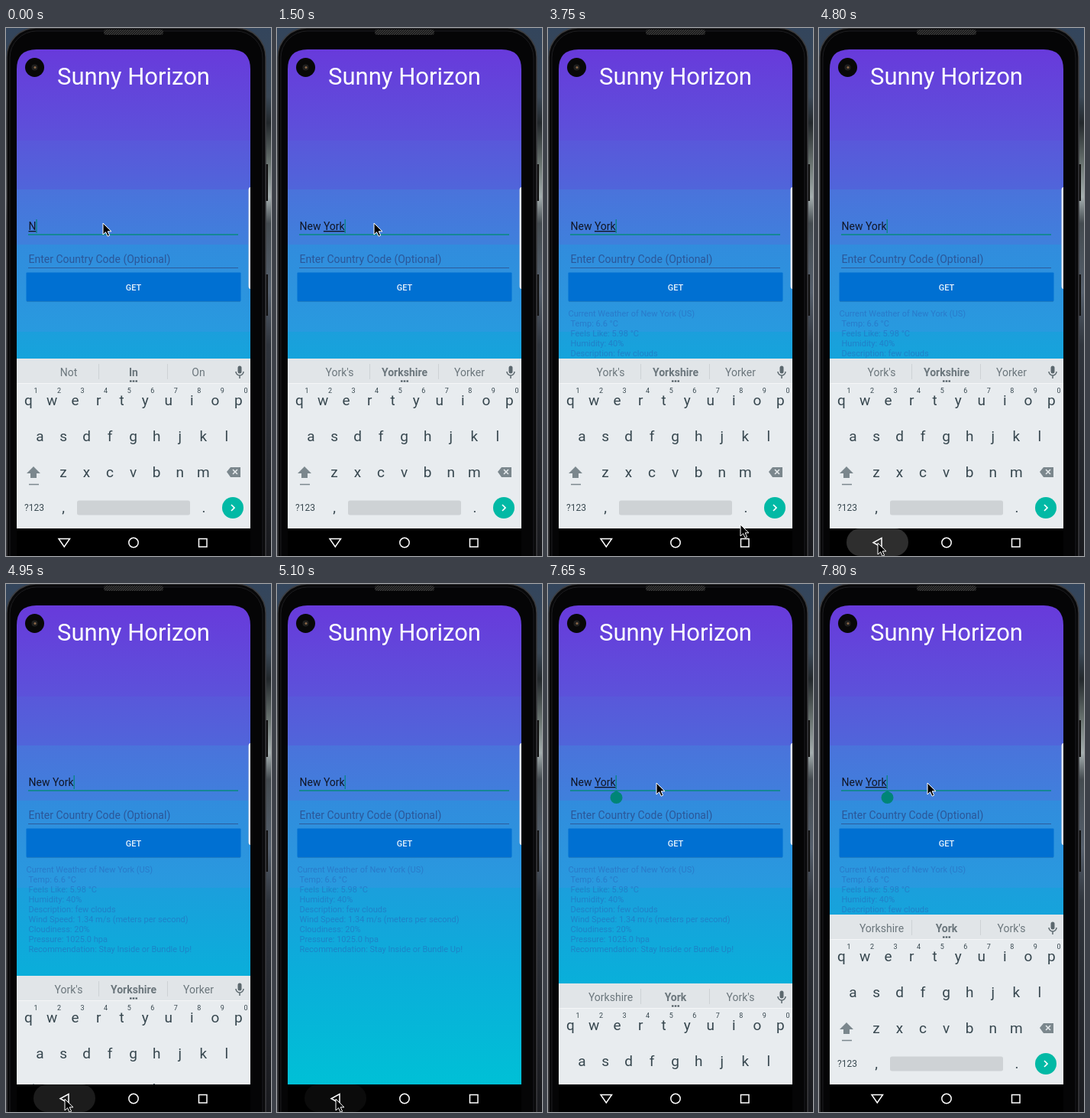
Write an HTML page that moves like this. It is 347 by 690 pixels and loops after 8000 ms.

```html
<!DOCTYPE html>
<html lang="en">
<head>
<meta charset="utf-8">
<style>
html, body { margin: 0; width: 347px; height: 690px; overflow: hidden; background: #000; }
svg { display: block; }
text { font-family: Roboto, sans-serif; white-space: pre; }
.mid { text-anchor: middle; }
.u { text-decoration: underline; }
</style>
</head>
<body>
<svg width="347" height="690" viewBox="0 0 347 690">
  <defs>
    <linearGradient id="sky" x2="0" y2="1">
      <stop offset="0" stop-color="#683adb"/>
      <stop offset=".19" stop-color="#5c52da"/>
      <stop offset=".19" stop-color="#5958da"/>
      <stop offset=".293" stop-color="#5065da"/>
      <stop offset=".293" stop-color="#4a73db"/>
      <stop offset=".407" stop-color="#3f80dc"/>
      <stop offset=".407" stop-color="#318cdd"/>
      <stop offset=".59" stop-color="#289adf"/>
      <stop offset=".59" stop-color="#1b9fdc"/>
      <stop offset=".77" stop-color="#0aaeda"/>
      <stop offset="1" stop-color="#00c0d6"/>
    </linearGradient>
    <linearGradient id="wall" x2="0" y2="1">
      <stop offset="0" stop-color="#33455c"/>
      <stop offset=".13" stop-color="#3b4856"/>
      <stop offset=".18" stop-color="#23282c"/>
      <stop offset=".26" stop-color="#6c7673"/>
      <stop offset=".32" stop-color="#a5afb0"/>
      <stop offset=".37" stop-color="#444b50"/>
      <stop offset=".5" stop-color="#555f6c"/>
      <stop offset=".6" stop-color="#30353d"/>
      <stop offset="1" stop-color="#191a1e"/>
    </linearGradient>
    <pattern id="mesh" width="3" height="3" patternUnits="userSpaceOnUse">
      <rect width="3" height="3" fill="#1b1b1b"/><path d="M0 3L3 0" stroke="#555" stroke-width=".7"/>
    </pattern>
    <clipPath id="screen"><path d="M14 654V54Q14 28 40 28H294Q320 28 320 54V654Z"/></clipPath>
  </defs>

  <rect width="347" height="690" fill="url(#wall)"/>
  <path d="M339 178h4v48h-4zM339 322h4v54h-4z" fill="#111"/>
  <rect x="1" y="0" width="339" height="740" rx="38" fill="#080809" stroke="#3c3d40" stroke-width="1.5"/>
  <rect x="5" y="4" width="331" height="740" rx="35" fill="#050506" stroke="#1d1d20"/>
  <rect x="128" y="2" width="78" height="7" rx="3.5" fill="url(#mesh)"/>

  <g clip-path="url(#screen)">
    <rect x="14" y="28" width="306" height="626" fill="url(#sky)"/>
    <text class="mid" x="167" y="74" font-size="31" fill="#fff">Sunny Horizon</text>
    <circle cx="37.500" cy="51.500" r="12.500" fill="#080808"/>
    <circle cx="37.500" cy="51.500" r="4" fill="#20201f"/>
    <circle cx="38" cy="51.500" r="1.500" fill="#8a6848"/>
    <path d="M29 270H304" stroke="#078a7e" stroke-width="1.600"/>
    <path d="M29 313.500H304" stroke="#2d5c9c"/>
    <text id="field" x="29.500" y="264" font-size="14" fill="#101626"><tspan id="done"></tspan><tspan id="word" class="u"></tspan></text>
    <path id="caret" d="M0 250V268" stroke="#07857f" stroke-width="1.300"/>
    <text x="29.500" y="307" font-size="14" fill="#2b5799">Enter Country Code (Optional)</text>
    <rect x="27" y="321" width="280" height="37" rx="1" fill="#1565a8" opacity=".5"/>
    <rect id="get" x="26.500" y="319.500" width="281" height="37.500" rx="1" fill="#0070d2"/>
    <text class="mid" x="167" y="342.500" font-size="11" font-weight="500" fill="#e8f2fc">GET</text>
    <g id="report" font-size="11" fill="#2a5db4" fill-opacity=".48"></g>
    <path id="handle" d="M89.500 270L95.200 273.500A8 8 0 1 1 83.800 273.500Z" fill="#008577"/>
    <path d="M320 208Q317.500 208 317.500 212V337Q317.500 341 320 341Z" fill="#dfe3ee"/>

    <g id="board">
      <rect x="14" y="432" width="306" height="222" fill="#e8ecef"/>
      <rect x="14" y="432" width="306" height="32" fill="#e1e5e8"/>
      <path d="M14 464.500H320" stroke="#f4f6f7"/>
      <path d="M121.500 439V459M211.500 439V459" stroke="#cdd2d5"/>
      <g id="hints" font-size="14" fill="#6b767c"></g>
      <path d="M162 461.500h2.500m1.250 0h2.500m1.250 0h2.500" stroke="#46535a" stroke-width="2"/>
      <g fill="none" stroke="#5c686e" stroke-width="1.500">
        <path d="M301 449a5 5 0 0 0 10 0M306 454V458"/>
        <path d="M306 444V449" stroke-width="5" stroke-linecap="round"/>
      </g>
      <g id="keys" fill="#37474f"></g>
      <path d="M36 573L45 582H40V588H32V582H27Z" fill="#7b878d"/>
      <path d="M30 596.500H43" stroke="#7b878d" stroke-width="1.500"/>
      <path d="M289 580L294 574H307V587H294Z" fill="#7b878d"/>
      <path d="M297 577l6 6m0-6l-6 6" stroke="#e8ecef" stroke-width="1.500"/>
      <rect x="93" y="617.500" width="148" height="19" rx="2.500" fill="#ced2d5"/>
      <circle cx="297" cy="627" r="14" fill="#02b9a5"/>
      <path d="M295 623l4 4-4 4" fill="none" stroke="#fff" stroke-width="1.700"/>
    </g>
  </g>

  <rect x="14" y="654" width="306" height="36" fill="#000"/>
  <rect id="press" x="36" y="654" width="81" height="36" rx="18" fill="#fff"/>
  <g fill="none" stroke="#fff" stroke-width="1.500">
    <path id="back"/>
    <circle cx="167" cy="672.500" r="6.200"/>
    <rect x="252.500" y="667.500" width="10.500" height="10.500"/>
  </g>
  <path id="mouse" d="M0 0V15L3.600 11.700 6.100 17.200 8.600 16.100 6.200 10.800H11Z" fill="#000" stroke="#fff" stroke-width="1"/>
</svg>
<script>
const LOOP = 8000, STEP = 150;
const $ = id => document.getElementById(id);
const label = (x, y, s, attrs = '') => `<text x="${x}" y="${y}" ${attrs}>${s}</text>`;
const mid = (x, y, s, size) => label(x, y, s, `class="mid" font-size="${size}"`);

$('report').innerHTML = [
  'Current Weather of New York (US)', 'Temp: 6.6 °C', 'Feels Like: 5.98 °C', 'Humidity: 40%',
  'Description: few clouds', 'Wind Speed: 1.34 m/s (meters per second)', 'Cloudiness: 20%',
  'Pressure: 1025.0 hpa', 'Recommendation: Stay Inside or Bundle Up!'
].map((s, i) => label(i ? 29.5 : 26.5, 377 + 13 * i, s)).join('');

$('keys').innerHTML = [['qwertyuiop', 29.5, 493], ['asdfghjkl', 44.5, 540], ['zxcvbnm', 75, 587]]
  .map(([row, x, y]) => [...row].map((c, i) => mid(x + 30.55 * i, y, c, 19)).join('')).join('')
  + [...'1234567890'].map((c, i) => mid(39 + 30.55 * i, 477, c, 9)).join('')
  + mid(37, 631, '?123', 12) + mid(75, 633, ',', 19) + mid(259, 633, '.', 19);

// [start, value]: each value holds until the next start
const typed = [[0, 'N'], [150, 'Ne'], [300, 'New'], [600, 'New '], [1050, 'New Y'],
  [1200, 'New Yo'], [1350, 'New Yor'], [1500, 'New York']];
const hints = [[0, 'Not In On'], [150, 'Need New Never'], [450, 'News New Newer'], [750, 'Year York one'],
  [1050, 'You Yes Your'], [1200, 'Your You York'], [1350, 'Yor York Your'],
  [1500, "York's Yorkshire Yorker"], [7650, "Yorkshire York York's"]];
const slide = [[0, 0], [4950, 80], [5100, 222], [7650, 90], [7800, 0]];
const glow = [[0, 0], [4650, .08], [4800, .18], [4950, .11], [5100, .045], [5400, 0]];
const caretOn = [[0, 1], [1950, 0], [2550, 1], [3000, 0], [3450, 1], [3900, 0], [4350, 1],
  [5400, 0], [5850, 1], [6300, 0], [6900, 1], [7350, 0], [7650, 1]];
const path = [[0, 127, 255], [1800, 127, 255], [2550, 163, 337], [3150, 163, 337], [3750, 252, 649],
  [4200, 190, 669], [4650, 77, 673], [6450, 77, 673], [6750, 185, 303], [7350, 142, 260], [LOOP, 142, 260]];

const at = (list, t) => list.findLast(e => e[0] <= t)[1];
const show = (id, on) => $(id).style.display = on ? '' : 'none';

function pointer(t) {
  const i = path.findIndex(p => p[0] > t), [t0, x0, y0] = path[i - 1], [t1, x1, y1] = path[i];
  const k = (t - t0) / (t1 - t0);
  return [x0 + (x1 - x0) * k, y0 + (y1 - y0) * k];
}

function draw(now) {
  const t = Math.floor(now % LOOP / STEP) * STEP;
  const text = at(typed, t), cut = text.lastIndexOf(' ') + 1;
  $('done').textContent = text.slice(0, cut);
  $('word').textContent = text.slice(cut);
  $('word').setAttribute('class', t >= 4800 && t < 7650 ? '' : 'u');
  $('caret').setAttribute('transform', `translate(${30 + $('field').getComputedTextLength()})`);
  show('caret', at(caretOn, t));
  show('report', t >= 3000);
  show('handle', t >= 7650);
  $('get').setAttribute('fill', t >= 2550 && t < 3000 ? '#2585da' : '#0070d2');
  $('hints').innerHTML = at(hints, t).split(' ').map((s, i) =>
    label([82, 167, 252][i], 454.5, s, `class="mid" font-weight="${i == 1 ? 700 : 400}"`)).join('');
  $('board').setAttribute('transform', `translate(0 ${at(slide, t)})`);
  $('press').setAttribute('opacity', at(glow, t));
  $('back').setAttribute('d', t >= 4800 && t < 7650
    ? 'M82 666.500V678.500L71 672.500Z' : 'M69 667.500H83.500L76.250 678Z');
  $('mouse').setAttribute('transform', `translate(${pointer(t)})`);
}

const start = performance.now();
function tick() {
  draw(performance.now() - start);
  requestAnimationFrame(tick);
}
tick();
</script>
</body>
</html>
```
